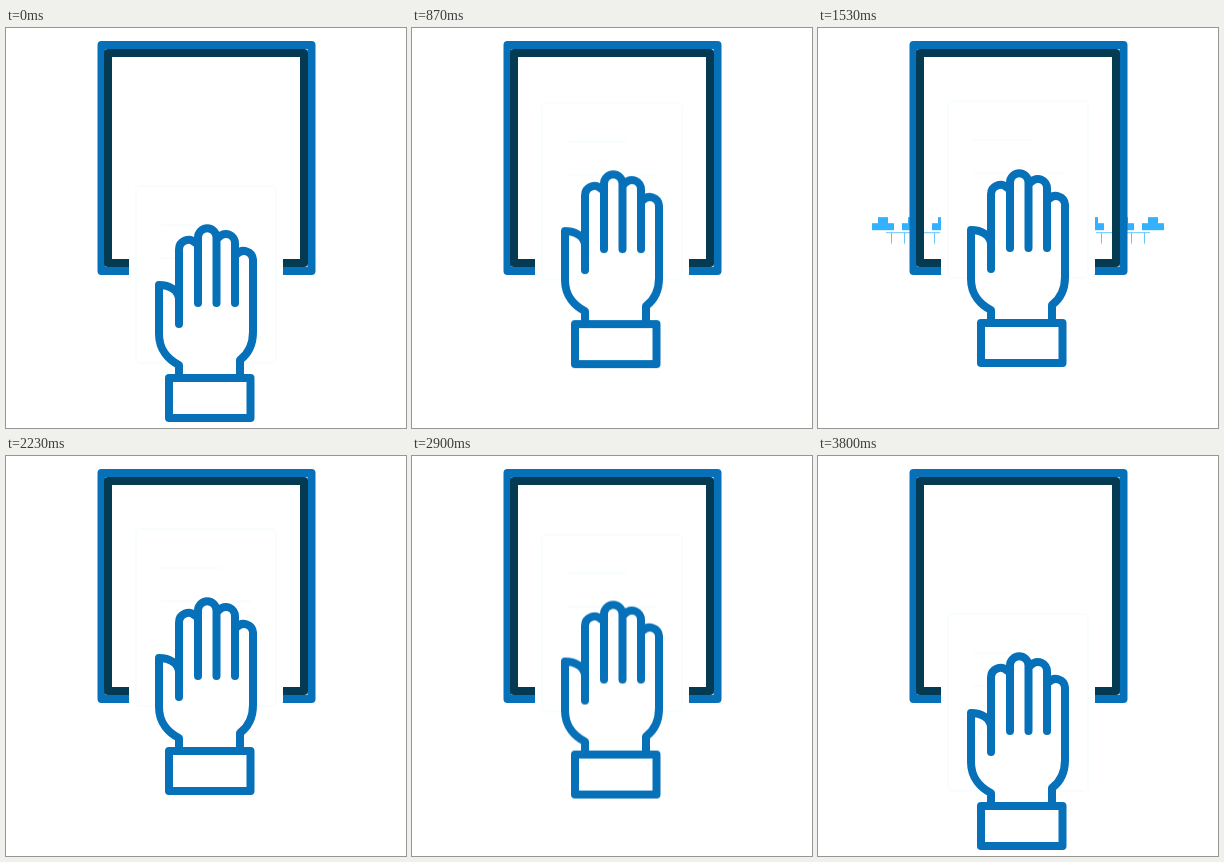
These frames come from a looping animation (400x400 px, 5330 ms). An HTML page:

```html
<!DOCTYPE html>
<html lang="en">
<head>
<meta charset="utf-8">
<title>Hand inserting a sheet</title>
<style>
  html, body { margin: 0; width: 100%; height: 100%; overflow: hidden; background: #fff; }
  svg { display: block; width: 100%; height: 100%; }

  .hand, .paper, .spray { animation: 5330ms linear infinite; }
  .hand { animation-name: hand; }
  .paper { animation-name: paper; }
  .spray { animation-name: spray; }

  .line { fill: none; stroke: #0671b8; stroke-width: 8; stroke-linecap: round; stroke-linejoin: round; }
  .faint { fill: none; stroke: #f8feff; stroke-width: 2; }

  @keyframes hand {
    0% { transform: translateY(0); animation-timing-function: cubic-bezier(.2, 0, .2, 1); }
    20.1%, 51.2% { transform: translateY(-55px); animation-timing-function: cubic-bezier(.4, 0, .4, 1); }
    71.3%, 100% { transform: translateY(0); }
  }
  @keyframes paper {
    0% { transform: translateY(0); animation-timing-function: cubic-bezier(.2, 0, .2, 1); }
    20.1%, 51.2% { transform: translateY(-85px); animation-timing-function: cubic-bezier(.4, 0, .4, 1); }
    71.3%, 100% { transform: translateY(0); }
  }
  /* two passes of the nozzle rows */
  @keyframes spray {
    0%, 21.1% { transform: translateY(-13px); opacity: 0; }
    21.2% { transform: translateY(-13px); opacity: 1; }
    22.5% { transform: translateY(0); opacity: 1; animation-timing-function: cubic-bezier(.5, .2, .8, .7); }
    30.6% { transform: translateY(205px); opacity: 1; }
    30.7% { transform: translateY(205px); opacity: 0; }
    42.2% { transform: translateY(58px); opacity: 0; }
    42.3% { transform: translateY(58px); opacity: 1; }
    51.2% { transform: translateY(188px); opacity: 1; }
    51.3%, 100% { transform: translateY(188px); opacity: 0; }
  }
</style>
</head>
<body>
<svg viewBox="0 0 400 400">
  <defs>
    <pattern id="caps" x="50" y="54" width="30" height="14" patternUnits="userSpaceOnUse">
      <path d="M10 0H20V6H26V13H4V6H10Z" fill="#33b1ff"/>
    </pattern>
    <pattern id="stems" x="65" y="68" width="30" height="13" patternUnits="userSpaceOnUse">
      <path d="M3 1.5H27M8.5 1.5V12.5M21.5 1.5V12.5" fill="none" stroke="#33b1ff" opacity=".75"/>
    </pattern>
  </defs>

  <g class="spray">
    <rect x="50" y="54" width="300" height="14" fill="url(#caps)"/>
    <rect x="65" y="68" width="270" height="13" fill="url(#stems)"/>
  </g>

  <g fill="none" stroke-linejoin="round">
    <rect x="95.5" y="17" width="210" height="226" stroke="#0671b8" stroke-width="8"/>
    <rect x="102" y="25" width="196" height="210" stroke="#053b52" stroke-width="8"/>
  </g>

  <g class="paper">
    <rect x="123" y="152" width="154" height="190" rx="12" fill="#fff"/>
    <rect class="faint" x="130" y="158" width="140" height="177" rx="4"/>
    <path class="faint" d="M155 197H215M155 230H245"/>
  </g>

  <g class="hand">
    <path fill="#fff" d="M173 346V337C163 332 153 322 153 306V257Q173 258 173 270V221A9.5 9.5 0 0 1 192 214A9.5 9.5 0 0 1 211 209A9.2 9.2 0 0 1 229 222A9.2 9.2 0 0 1 247 231V304C247 318 242 326 234 332V390H163V350H173Z"/>
    <g class="line">
      <path d="M173 296V221.5A9.5 9.5 0 0 1 189 214.5"/>
      <path d="M192 275V209.5A9.25 9.25 0 0 1 210.5 209.5V275"/>
      <path d="M213 209A9.2 9.2 0 0 1 229 215.5V275"/>
      <path d="M231 226A9.2 9.2 0 0 1 247 231.5V304C247 318 242 326 234 332V346"/>
      <path d="M173 272C173 262 163 257 153 257V306C153 322 163 332 173 337V346"/>
      <rect x="163" y="350" width="81.5" height="40"/>
    </g>
  </g>
</svg>
</body>
</html>
```
